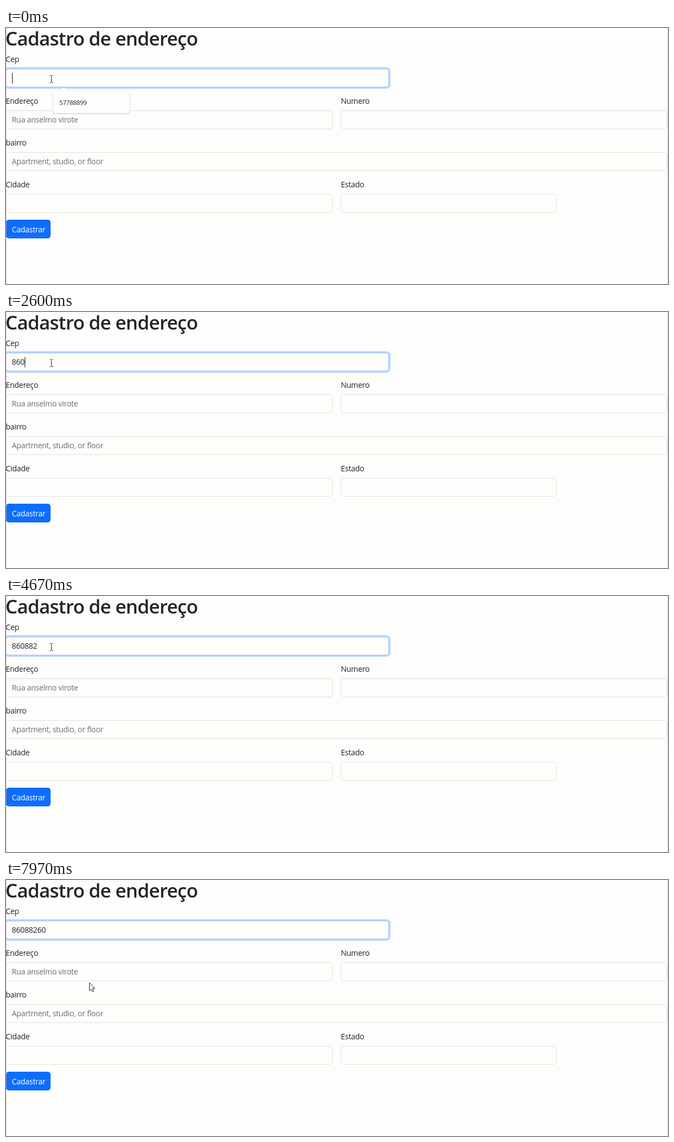
These frames come from a looping animation (1203x466 px, 8 s). An HTML page:

```html
<!DOCTYPE html>
<html lang="pt-BR">
<head>
<meta charset="utf-8">
<title>Cadastro de endereço</title>
<style>
  html, body { margin: 0; width: 100%; height: 100%; overflow: hidden; background: #fdfdfc; }
  svg { display: block; width: 1203px; height: 466px; }
  text { font: 14px "Open Sans", "Noto Sans", sans-serif; letter-spacing: -.29px; fill: #212529; }
  .title { font-size: 34.5px; font-weight: 600; letter-spacing: -.72px; }
  .hint { fill: #6b7075; }
  .small { font-size: 11.4px; letter-spacing: -.3px; }
  .field { fill: #fdfdfc; stroke: #dfe0d8; }
  .edge { stroke: #d5a3a6; stroke-dasharray: 2 2; }
  #popup { filter: drop-shadow(0 1px 1.5px #5a507055); }
</style>
</head>
<body>
<svg viewBox="0 0 1203 466">
  <rect width="1203" height="466" fill="#fdfdfc"/>
  <text class="title" x="-1" y="32">Cadastro de endereço</text>

  <g id="form"></g>

  <rect x="-4" y="71" width="703" height="40" rx="8" fill="#c2dbfe"/>
  <rect x="-.5" y="74.500" width="696" height="33" rx="5" fill="#fdfdfc" stroke="#86b7fe"/>
  <text id="code" x="10.500" y="96"></text>
  <rect id="caret" y="82" width="1" height="19" fill="#111"/>

  <rect y="349" width="81" height="34" rx="5" fill="#0d6efd"/>
  <text x="10.500" y="372" style="fill:#fff">Cadastrar</text>

  <path class="edge" d="M.5 0V466M1202.5 0V466"/>

  <g id="popup">
    <path d="M88 115H96L104.500 107.500L113 115H221.500a3 3 0 0 1 3 3V152a3 3 0 0 1-3 3H88.500a3 3 0 0 1-3-3V118a3 3 0 0 1 3-3Z" fill="#fdfdfc"/>
    <text class="small" x="97" y="139.500">57788899</text>
  </g>

  <path id="beam" d="M-3-6.500H-1L0-5.500L1-6.500H3M0-5.500V5.500M-3 6.500H-1L0 5.500L1 6.500H3" fill="none" stroke="#222"/>
  <path id="arrow" d="M.5 0V14.500L3.800 11.500L6.200 16.500L8.400 15.500L6.200 10.700H10.500Z" fill="#fff" stroke="#222"/>
</svg>
<script>
const $ = id => document.getElementById(id);
const LOOP = 8000, BLINK = 530;

// label, x, label baseline, right edge, placeholder
const fields = [
  ["Endereço", -.5, 138, 594, "Rua anselmo virote"],
  ["Numero", 608.5, 138, 1202, ""],
  ["bairro", -.5, 214, 1202, "Apartment, studio, or floor"],
  ["Cidade", -.5, 290, 594, ""],
  ["Estado", 608.5, 290, 1001, ""]
];
$("form").innerHTML = `<text x="-.5" y="62">Cep</text>` + fields.map(([label, x, y, right, hint]) => `
  <text x="${x}" y="${y}">${label}</text>
  <rect class="field" x="${x}" y="${y + 12.5}" width="${right - .5 - x}" height="33" rx="5"/>
  <text class="hint" x="${x + 11}" y="${y + 34}">${hint}</text>`).join("");

const code = "86088260";
const keyTimes = [1690, 2120, 2480, 2800, 3040, 4000, 5200, 6300];
const move = { start: 7100, end: 7750, from: [82.5, 93], to: [151, 187] };

const clamp = v => Math.max(0, Math.min(1, v));
const ease = v => v * v * (3 - 2 * v);

function draw(t) {
  const typed = keyTimes.filter(k => k <= t).length;
  $("code").textContent = code.slice(0, typed);
  const since = t - (typed ? keyTimes[typed - 1] : 0);
  $("caret").setAttribute("x", Math.round(10.6 + typed * 7.68));
  $("caret").setAttribute("opacity", since % (2 * BLINK) < BLINK ? 1 : 0);

  // the suggestion fades quickly, leaving a faint trace for a moment
  const fade = 1 - .92 * clamp((t - keyTimes[0]) / 100);
  $("popup").setAttribute("opacity", t < 2530 ? fade : 0);

  const p = ease(clamp((t - move.start) / (move.end - move.start)));
  const [x, y] = move.from.map((a, i) => a + (move.to[i] - a) * p);
  const overInput = y < 108 || (y > 150 && y < 184);
  for (const [id, shown] of [["beam", overInput], ["arrow", !overInput]]) {
    $(id).setAttribute("transform", `translate(${x} ${y})`);
    $(id).setAttribute("opacity", shown ? 1 : 0);
  }
}

const start = performance.now();
function tick() {
  draw((performance.now() - start) % LOOP);
  requestAnimationFrame(tick);
}
tick();
</script>
</body>
</html>
```
